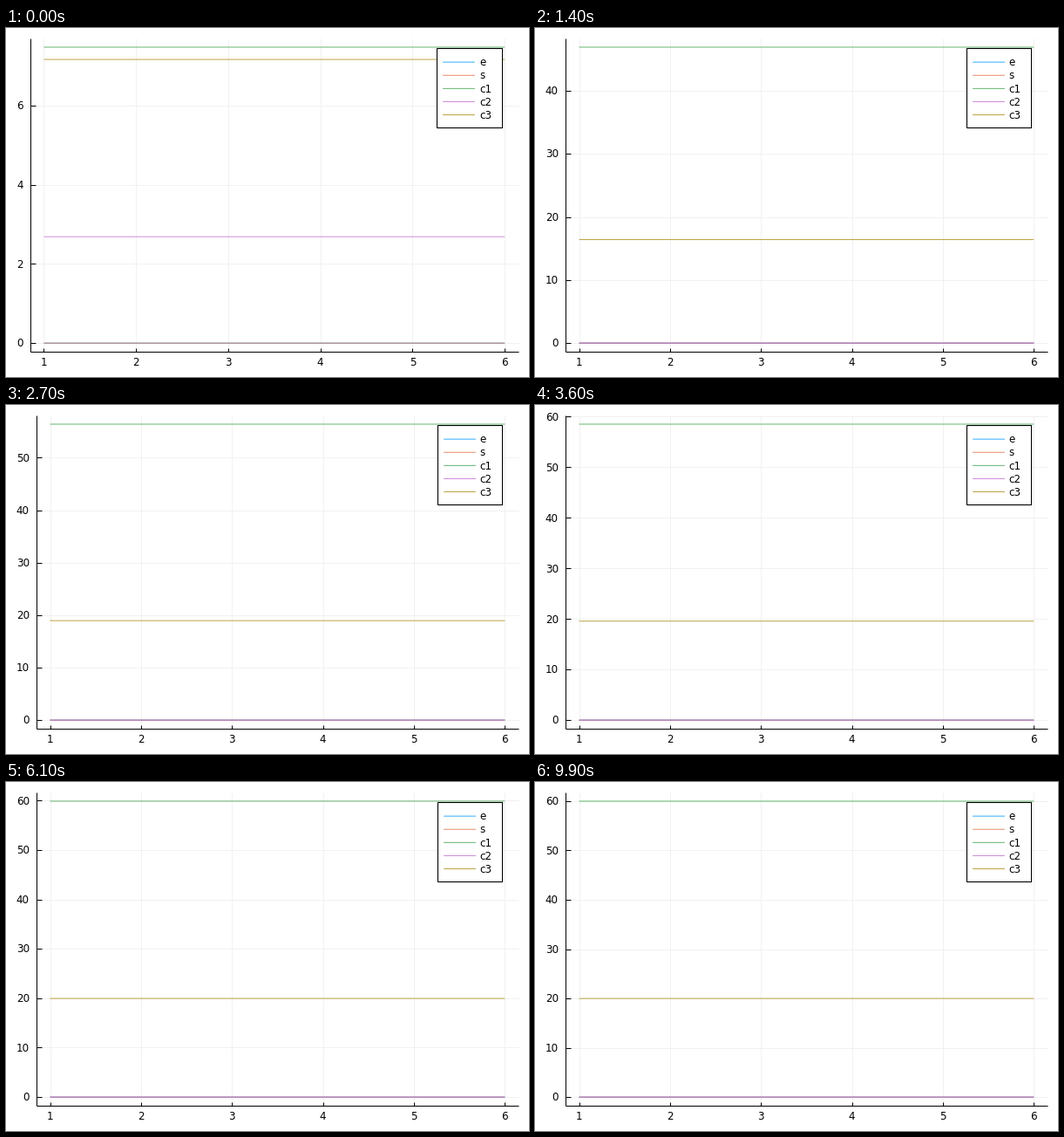
These frames come from a looping animation (600 by 400 pixels, 10000 ms). A matplotlib script:

```python
import math
import numpy as np
import matplotlib.pyplot as plt
from matplotlib.animation import FuncAnimation

W, H, DPI = 600, 400, 100
FRAMES, INTERVAL = 100, 100
TOP, BOTTOM, RIGHT = 11.8, 371.3, 588
PAD = 0.03
PX = 72 / DPI
GRID = "#f1f1f1"
FONT = dict(family="DejaVu Sans", fontsize=8.6, color="black", va="baseline")
NAMES = ["e", "s", "c1", "c2", "c3"]
COLORS = ["#009afa", "#e36f47", "#3ea44e", "#c371d2", "#ac8e18"]

fig = plt.figure(figsize=(W / DPI, H / DPI), dpi=DPI, facecolor="white")
ax = fig.add_axes([0, 0, 1, 1])


def levels(k):
    """Concentrations of e, s, c1, c2, c3 at step k."""
    slow = math.exp(-0.0992 * k)
    c1 = 60 - 52.52 * slow
    c2 = 2.69 * math.exp(-0.397 * k)
    c3 = 20 - slow * (15.9 - 3.07 * math.exp(-0.055 * k))
    return [0, 0, c1, c2, c3]


def nice_ticks(top):
    """Pick the best-scoring tick step for an axis padded around 0..top."""
    span, hi = top * (1 + 2 * PAD), top * (1 + PAD)
    best, ticks = -1, []
    for q, nice in [(1, 1), (5, 0.9), (2, 0.7), (2.5, 0.5), (3, 0.2)]:
        for scale in (1, 10):
            step = q * scale
            n = int(hi / step) + 1
            if not 4 <= n <= 8:
                continue
            score = (1 - abs(n - 5) / 5) / 4 + span / (n - 1) / step / 2 + nice / 4
            if score > best:
                best, ticks = score, np.arange(n) * step
    return ticks


def line(xs, ys, color="black", width=1.0, **kw):
    ax.plot(xs, ys, color=color, lw=width * PX, solid_capstyle="butt", **kw)


def curve(xs, y, color, zorder):
    line(xs, [y, y], color, 0.8, zorder=zorder, snap=False)


def legend(left):
    x0 = 494.3 + (left - 27.6) * 0.14
    ax.add_patch(plt.Rectangle((x0, 23.3), 569.3 - x0, 90.7, fc="white",
                               ec="black", lw=1.1 * PX, zorder=5))
    for i, (name, color) in enumerate(zip(NAMES, COLORS)):
        y = 39.1 + 15.1 * i
        curve([x0 + 6.8, x0 + 43.6], y, color, 6)
        ax.text(543.7, y + 4.2, name, zorder=6, **FONT)


def draw(k):
    ax.clear()
    ax.set(xlim=(0, W), ylim=(H, 0))
    ax.axis("off")

    values = levels(k)
    peak = max(values)
    ticks = nice_ticks(peak)
    left = 27.6 if peak < 10 else 34.9

    def px(x):
        return left + (RIGHT - left) * ((x - 1) / 5 + PAD) / (1 + 2 * PAD)

    def py(v):
        return BOTTOM - (BOTTOM - TOP) * (v / peak + PAD) / (1 + 2 * PAD)

    for x in range(1, 7):
        line([px(x)] * 2, [TOP, BOTTOM], GRID, zorder=1)
        line([px(x)] * 2, [BOTTOM - 4.5, BOTTOM])
        ax.text(px(x), 387.2, str(x), ha="center", **FONT)
    for v in ticks:
        y = py(v)
        line([left, RIGHT], [y, y], GRID, zorder=1)
        line([left, left + 6.5], [y, y])
        ax.text(left - 8, y + 4.3, f"{v:g}", ha="right", **FONT)
    line([left, left], [TOP, BOTTOM])
    line([left, RIGHT], [BOTTOM, BOTTOM])

    for v, color in zip(values, COLORS):
        curve([px(1), px(6)], py(v), color, 3)
    legend(left)
    return []


anim = FuncAnimation(fig, draw, frames=FRAMES, interval=INTERVAL,
                     init_func=lambda: [], repeat=True, repeat_delay=0, blit=False)
plt.show()
```
